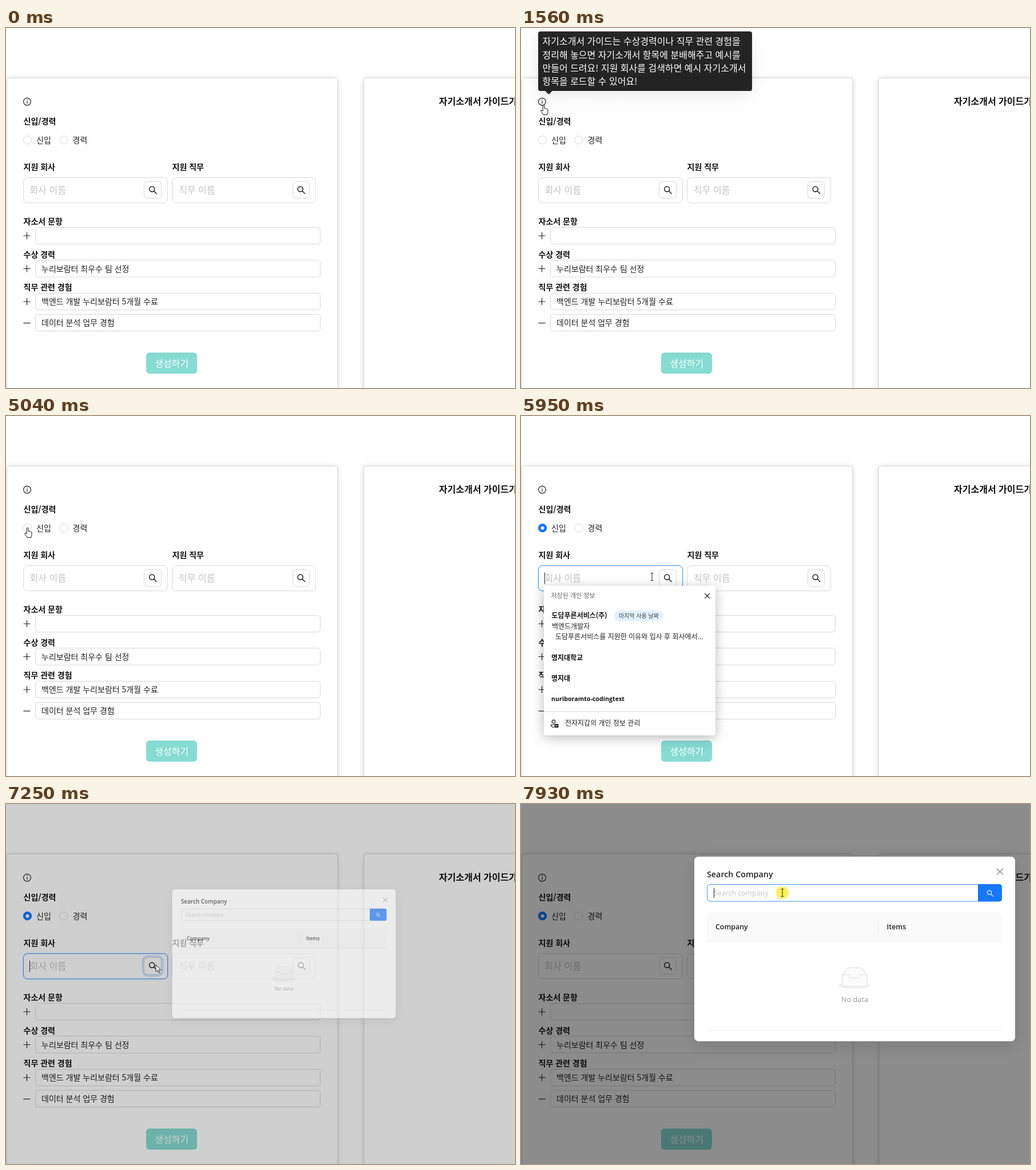
Write an HTML page that moves like this. It is 890x629 px and loops after 7990 ms.

```html
<!DOCTYPE html>
<html lang="ko">
<head>
<meta charset="utf-8">
<title>자기소개서 가이드</title>
<style>
html, body { margin: 0; width: 100%; height: 100%; overflow: hidden; background: #fff; }
svg { display: block; width: 890px; height: 629px; }
text { font: 14px "Noto Sans CJK KR", "Noto Sans CJK JP", "Noto Sans", sans-serif; fill: #222; }
.b { font-weight: 700; fill: #111; }
.l { font-size: 16px; }
.ph { fill: #c4c4c4; }
.w { fill: #fff; }
.line { fill: none; stroke: #222; stroke-width: 1.2; }
.box { fill: none; stroke: #d9d9d9; }
.card { fill: #fff; stroke: #dcdcdc; filter: drop-shadow(0 1px 4px rgba(0,0,0,.16)); }
.mag { fill: none; stroke: #1c1c1c; stroke-width: 1.5; }
#tip { filter: drop-shadow(0 6px 10px rgba(0,0,0,.06)) drop-shadow(0 9px 16px rgba(0,0,0,.05)); transform-origin: 48px 115px; }
#popup text { font-size: 12px; }
#popup .s { font-size: 11px; fill: #666; }
#popup .xs { font-size: 10px; fill: #444; }
#popup .en { font: 700 10.7px "Open Sans", "Noto Sans", sans-serif; }
#panel { filter: drop-shadow(0 4px 10px rgba(0,0,0,.28)); }
#modal { transform-origin: 262px 281px; }
#modal text { font: 12.4px "Open Sans", "Noto Sans", sans-serif; }
#modal .h { font-weight: 600; }
#modal .title { font-size: 14.3px; }
#modal .empty { font-size: 12.7px; fill: #999; }
#modalBg { filter: drop-shadow(0 6px 12px rgba(0,0,0,.12)); }
#pointer path { stroke-linejoin: round; }
</style>
</head>
<body>
<svg viewBox="0 0 890 629">
  <defs>
    <g id="mag"><circle cx="-1.3" cy="-1.5" r="4.5"/><path d="M2 1.8 7 6.8"/></g>
    <path id="plus" d="M-6 0H6M0-6V6"/>
  </defs>

  <rect class="card" x="1.5" y="87.5" width="578" height="600" rx="4"/>
  <g id="side"><rect class="card" x="625.5" y="87.5" width="400" height="600" rx="4"/></g>
  <text class="b l" x="757" y="128" dy=".36em">자기소개서 가이드가</text>

  <circle class="line" cx="37" cy="128.7" r="6.4"/>
  <path class="line" d="M37 124.8v1.5M37 127.6v4.7"/>

  <g id="labels">
    <text class="b" x="30.5" y="162.5" dy=".36em">신입/경력</text>
    <text x="53" y="195.5" dy=".36em">신입</text>
    <text x="116.5" y="195.5" dy=".36em">경력</text>
    <text class="b" x="30.5" y="243" dy=".36em">지원 회사</text>
    <text class="b" x="290.5" y="243" dy=".36em">지원 직무</text>
    <text class="b" x="30.5" y="338" dy=".36em">자소서 문항</text>
    <text class="b" x="30.5" y="395.5" dy=".36em">수상 경력</text>
    <text class="b" x="30.5" y="453" dy=".36em">직무 관련 경험</text>
    <text x="62" y="420.5" dy=".36em">누리보람터 최우수 팀 선정</text>
    <text x="62" y="478" dy=".36em">백엔드 개발 누리보람터 5개월 수료</text>
    <text x="62" y="515.3" dy=".36em">데이터 분석 업무 경험</text>
  </g>

  <circle class="box" cx="37.5" cy="195.7" r="7.1"/>
  <circle class="box" cx="101" cy="195.7" r="7.1"/>
  <g id="radio">
    <circle cx="37.5" cy="195.7" r="7.6" fill="#1677ff"/>
    <circle id="dot" cx="37.5" cy="195.7" r="3" fill="#fff"/>
  </g>

  <rect id="glow" x="29.5" y="260.5" width="254" height="46" rx="9" fill="none" stroke="#0591ff" stroke-opacity=".12" stroke-width="2"/>
  <rect id="field" class="box" x="30.5" y="261.5" width="252" height="44" rx="7"/>
  <rect class="box" x="290.5" y="261.5" width="251" height="44" rx="7"/>
  <text class="ph l" x="41.5" y="283" dy=".36em">회사 이름</text>
  <text class="ph l" x="302" y="283" dy=".36em">직무 이름</text>
  <path id="caret" d="M41.5 273.5v20" stroke="#222"/>
  <rect id="wave" x="239.5" y="266.5" width="34" height="33" rx="8" fill="none" stroke="#5aa0ff" stroke-width="4"/>
  <rect id="find" class="box" x="241.5" y="268.5" width="30" height="29" rx="5"/>
  <use id="findIcon" class="mag" href="#mag" x="256.5" y="283"/>
  <g id="find2">
    <rect class="box" x="501.5" y="268.5" width="29" height="29" rx="5"/>
    <use class="mag" href="#mag" x="516" y="283"/>
  </g>

  <rect class="box" x="51.5" y="348.5" width="498" height="29" rx="5"/>
  <rect class="box" x="51.5" y="405.5" width="498" height="29.5" rx="5"/>
  <rect class="box" x="51.5" y="463.5" width="498" height="29" rx="5"/>
  <rect class="box" x="51.5" y="500.5" width="498" height="29" rx="5"/>
  <use class="line" href="#plus" x="36.5" y="363"/>
  <use class="line" href="#plus" x="36.5" y="420.5"/>
  <use class="line" href="#plus" x="36.5" y="478"/>
  <path class="line" d="M30.5 515.5h12"/>

  <rect x="245" y="567" width="89" height="37" rx="6" fill="#86dbd3"/>
  <text class="w l" x="289.8" y="586" dy=".36em" text-anchor="middle">생성하기</text>

  <g id="tip">
    <path d="M34 6H400a4 4 0 0 1 4 4V106a4 4 0 0 1-4 4H54.5L48.5 116 42.5 110H34a4 4 0 0 1-4-4V10a4 4 0 0 1 4-4Z" fill="#000" fill-opacity=".85"/>
    <text class="w l" x="37.5" y="23" dy=".36em">자기소개서 가이드는 수상경력이나 직무 관련 경험을</text>
    <text class="w l" x="37.5" y="47" dy=".36em">정리해 놓으면 자기소개서 항목에 분배해주고 예시를</text>
    <text class="w l" x="37.5" y="70.5" dy=".36em">만들어 드려요! 지원 회사를 검색하면 예시 자기소개서</text>
    <text class="w l" x="37.5" y="93.5" dy=".36em">항목을 로드할 수 있어요!</text>
  </g>

  <g id="popup">
    <rect id="panel" x="40" y="296.5" width="300" height="261.5" rx="4" fill="#fff"/>
    <text class="s" x="52.5" y="314" dy=".36em">저장된 개인 정보</text>
    <path class="line" d="M321.3 310l8.5 8.5m0-8.5l-8.5 8.5"/>
    <text class="b" x="53.5" y="348.5" dy=".36em">도담푸른서비스(주)</text>
    <rect x="163" y="340" width="86" height="18.5" rx="9.2" fill="#e2f1fc"/>
    <text class="xs" x="206" y="349" dy=".36em" text-anchor="middle">마지막 사용 날짜</text>
    <text x="54" y="367.5" dy=".36em">백엔드개발자</text>
    <text x="60" y="386" dy=".36em">도담푸른서비스를 지원한 이유와 입사 후 회사에서...</text>
    <text class="b" x="53" y="422.5" dy=".36em">명지대학교</text>
    <text class="b" x="53" y="458.5" dy=".36em">명지대</text>
    <text class="b en" x="53" y="494" dy=".36em">nuriboramto-codingtest</text>
    <path d="M40 516.5h300" stroke="#ddd"/>
    <circle class="line" cx="57" cy="534" r="2.8"/>
    <path class="line" d="M58 539.5h-5.5c0 3 2 4.5 5.5 4.5"/>
    <rect x="58.5" y="538" width="7" height="6.5" rx="1" fill="#222"/>
    <path d="M60 541.2h4" stroke="#fff"/>
    <text x="77" y="537" dy=".36em">전자지갑의 개인 정보 관리</text>
  </g>

  <rect id="mask" width="890" height="629"/>

  <g id="modal">
    <rect id="modalBg" x="303" y="92" width="561" height="322.5" rx="7" fill="#fff"/>
    <text class="h title" x="325" y="122.5" dy=".36em">Search Company</text>
    <path d="M832 112.5l11 11m0-11l-11 11" stroke="#888" stroke-width="1.3"/>
    <path id="query" class="box" d="M799 140.5H331a5.5 5.5 0 0 0-5.5 5.5v18.5a5.5 5.5 0 0 0 5.5 5.5h468"/>
    <text class="ph" x="337" y="156" dy=".34em">Search company</text>
    <path id="queryCaret" d="M337.5 146.5v17.5" stroke="#222"/>
    <path d="M799 140h37a5 5 0 0 1 5 5v20.5a5 5 0 0 1-5 5h-37Z" fill="#1677ff"/>
    <g transform="translate(820 156) scale(.8)" class="mag" style="stroke:#fff"><use href="#mag"/></g>
    <path d="M325 240v-44a7 7 0 0 1 7-7h502a7 7 0 0 1 7 7v44Z" fill="#fafafa"/>
    <path d="M325 240.5h516M325 395.5h516M624.5 204v22" stroke="#eee"/>
    <text class="h" x="340" y="215" dy=".36em">Company</text>
    <text class="h" x="639.5" y="215" dy=".36em">Items</text>
    <g transform="translate(553.4 286) scale(.94)">
      <ellipse cx="32" cy="33" rx="31" ry="6.5" fill="#f3f3f3"/>
      <path d="M9 13 19 1.3Q20 0 21.5 0h21Q44 0 45 1.3L55 13v18q0 4-3.5 4h-39Q9 35 9 31Z" fill="#fcfcfc" stroke="#d9d9d9"/>
      <path d="M9 13h11q2.4 0 2.4 3t2.6 3h14q2.6 0 2.6-3t2.4-3h11" fill="none" stroke="#d9d9d9"/>
    </g>
    <text class="empty" x="583.5" y="341" dy=".36em" text-anchor="middle">No data</text>
  </g>

  <g id="pointer">
    <circle id="click" r="11" fill="#fdee3c" fill-opacity=".85"/>
    <path id="arrow" d="M0 0V12L2.8 9.5 4.8 14 6.8 13.2 4.8 8.8H8.5Z" fill="#fff" stroke="#111" stroke-width=".9"/>
    <path id="hand" d="M-1.8 8V1Q-1.8-.5-.4-.5T1 1V5.5Q2.3 4.8 3.3 6 4.6 5.4 5.4 6.6 7 6.2 7 8V12Q7 14 5.5 16.5H-1.2Q-2 14-5.2 10.5-5.5 8.5-4 8.5-3 8.8-1.8 10Z" fill="#fff" stroke="#111"/>
    <path id="beam" d="M-2.5-6.5H-.7L0-6 .7-6.5H2.5M0-6V6M-2.5 6.5H-.7L0 6 .7 6.5H2.5" fill="none" stroke="#333" stroke-width="1.1"/>
  </g>
</svg>
<script>
const LOOP = 7990;
const $ = id => document.getElementById(id);
const clamp = v => Math.min(1, Math.max(0, v));
const ramp = (t, from, to) => clamp((t - from) / (to - from));
const within = (t, from, to) => t >= from && t < to;
const show = (id, on) => $(id).style.opacity = +on;

const bursts = [
  [160, 890, 12], [960, 1560, 9], [4500, 5230, 12], [5300, 5490, 4],
  [5840, 6090, 5], [6360, 6700, 6], [6900, 7650, 12], [7720, 7930, 4]
];

// Pointer path: time, x, y, shape
const path = [
  [160, 808, 604, 'arrow'], [890, 52, 139, 'arrow'], [1035, 40, 135, 'hand'],
  [4499, 40, 135, 'hand'], [4500, 40, 150, 'arrow'], [4890, 38, 195, 'hand'],
  [5230, 38, 197, 'hand'], [5363, 140, 245, 'arrow'], [5490, 229, 281, 'beam'],
  [6300, 229, 281, 'beam'], [6490, 245, 281, 'arrow'], [6632, 262, 281, 'arrow'],
  [7380, 262, 281, 'arrow'], [7650, 462, 186, 'arrow'], [7720, 460, 172, 'arrow'],
  [7790, 458, 160, 'beam'], [7860, 457, 155, 'beam'], [LOOP, 457, 155, 'beam']
];

function snap(t) {
  let last = 0;
  for (const [from, to, n] of bursts) {
    if (t < from) break;
    const step = (to - from) / (n - 1);
    last = from + Math.min(n - 1, Math.floor((t - from) / step + 1e-6)) * step;
  }
  return last;
}

function movePointer(t) {
  show('pointer', t >= 160);
  const i = Math.max(0, path.findLastIndex(p => p[0] <= t + .01));
  const a = path[i], b = path[i + 1] || a;
  const p = b === a ? 0 : ramp(t, a[0], b[0]);
  const e = p * p * (3 - 2 * p);
  const x = a[1] + (b[1] - a[1]) * e, y = a[2] + (b[2] - a[2]) * e;
  $('pointer').setAttribute('transform', `translate(${x} ${y})`);
  for (const id of ['arrow', 'hand', 'beam']) show(id, a[3] === id);
  show('click', within(t, 5229, 5299) || within(t, 5839, 5899) || within(t, 6899, 6960) || t > 7855);
}

function render(t) {
  movePointer(t);

  const tip = ramp(t, 1230, 1400) * (1 - ramp(t, 4660, 4790));
  show('tip', tip);
  $('tip').style.transform = `scale(${.8 + .2 * tip})`;

  const picked = ramp(t, 5240, 5440);
  show('radio', t > 5299);
  $('dot').setAttribute('r', 3 * picked);

  const focus = within(t, 5839, 7376);
  show('glow', focus);
  $('field').style.stroke = focus ? '#4096ff' : '';
  show('caret', focus && (t < 6359 || t > 6899));
  show('popup', within(t, 5901, 6960));

  const hover = within(t, 6489, 7240);
  $('find').style.stroke = hover ? '#4096ff' : '';
  $('findIcon').style.stroke = hover ? '#1677ff' : '';
  show('wave', within(t, 7240, 7500) ? .3 * (1 - ramp(t, 7240, 7500)) : 0);

  const nudge = t > 6960 ? 'translate(.7)' : '';
  $('side').setAttribute('transform', nudge);
  $('find2').setAttribute('transform', nudge);

  show('mask', .45 * ramp(t, 7157, 7357));
  const open = 1 - (1 - ramp(t, 7188, 7488)) ** 5;
  show('modal', open);
  $('modal').style.transform = `scale(${.2 + .8 * open})`;
  $('query').style.stroke = t > 7719 ? '#4096ff' : '';
  show('queryCaret', t > 7855);
}

function frame(now) {
  render(snap(now % LOOP));
  requestAnimationFrame(frame);
}
frame(performance.now());
</script>
</body>
</html>
```
